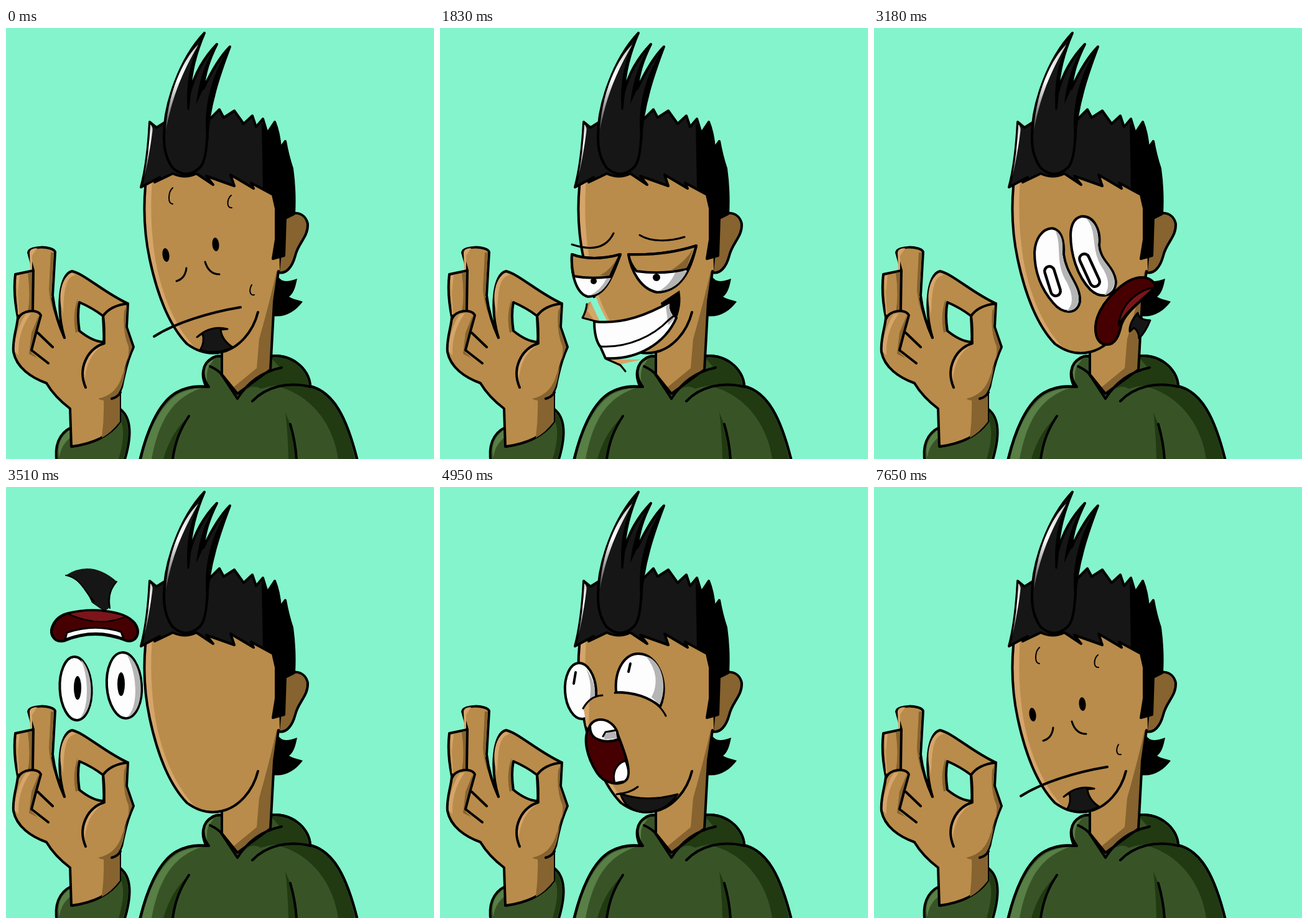
An HTML page for the animation above (8100 ms loop, 688x693 px).

```html
<!DOCTYPE html>
<html lang="en">
<head>
<meta charset="utf-8">
<title>Face shuffle</title>
<style>
  html, body { margin: 0; width: 100%; height: 100%; overflow: hidden; background: #84f4cc; }
  svg { display: block; width: 100%; height: 100%; }
  path, ellipse { stroke: #000; stroke-width: 4; stroke-linejoin: round; stroke-linecap: round; fill: none; }
  .flat { stroke: none; }
  .skin { fill: #b98c4b; }
  .light { fill: #d5a56a; stroke: none; }
  .shade { fill: #86632f; stroke: none; }
  .hair { fill: #161616; }
  .dark { fill: #000; stroke: none; }
  .cloth { fill: #385427; }
  .cloth-dark { fill: #213a12; stroke: none; }
  .cloth-light { fill: #587f45; stroke: none; }
  .white { fill: #fdfdfd; }
  .grey { fill: #b5b5b5; stroke: none; }
  .gloss { fill: url(#gloss); stroke: none; }
  .mouth { fill: #460002; }
  .tongue { fill: #7b1519; }
  .bg { fill: #84f4cc; }
  .thin { stroke-width: 2; }
  .fine { stroke-width: 3; }
  .ring { stroke-width: 20; }
  .ring-core { stroke: #fdfdfd; stroke-width: 11; }

  /* Each face: 420 ms in, 930 ms hold, 420 ms out, then waits off stage. */
  .face { animation: 8100ms infinite both; animation-delay: calc(480ms + 1350ms * var(--slot) - 8100ms); }
  .top-right { animation-name: topRight; }
  .left-down { animation-name: leftDown; }
  @keyframes topRight {
    0% { transform: translate(0, -720px); animation-timing-function: steps(14, jump-both); }
    5.185185%, 16.666667% { transform: none; animation-timing-function: steps(14, jump-both); }
    21.851852%, 100% { transform: translate(810px, 0); }
  }
  @keyframes leftDown {
    0% { transform: translate(-810px, 0); animation-timing-function: steps(14, jump-both); }
    5.185185%, 16.666667% { transform: none; animation-timing-function: steps(14, jump-both); }
    21.851852%, 100% { transform: translate(0, 720px); }
  }
  .nudge { animation: nudge 8100ms step-end infinite; }
  @keyframes nudge { 0% { transform: none; } 50%, 100% { transform: translate(-2px, 1px); } }
  .gap { stroke: #84f4cc; stroke-width: 6; stroke-linecap: butt; animation: gap 8100ms step-end infinite; }
  @keyframes gap { 0% { opacity: 0; } 11.111111% { opacity: 1; } 24% { opacity: 0; } }
</style>
</head>
<body>
<svg viewBox="0 0 688 693" preserveAspectRatio="none">
  <defs>
    <linearGradient id="gloss" x1="0" y1="0" x2="0" y2="1">
      <stop offset="0" stop-color="#ccc"/><stop offset=".4" stop-color="#fff"/><stop offset="1" stop-color="#444"/>
    </linearGradient>
  </defs>
  <rect width="688" height="693" fill="#84f4cc"/>

  <g id="tail-and-ear">
    <path class="dark" d="M434 394C442 410 450 409 468 403C465 418 462 427 455 432C463 437 470 437 477 440C464 457 448 466 428 463Z"/>
    <path class="shade" style="stroke:#000" d="M446 307C458 292 481 295 485 315C486 336 470 345 465 366C460 385 450 396 438 393Z"/>
  </g>

  <g id="hoodie">
    <path class="cloth" d="M214 700C225 652 244 603 274 586C290 577 306 575 322 577C313 560 315 540 331 531Q338 526 349 528L372 560L424 528C455 522 488 546 489 576C526 585 548 625 566 700Z"/>
    <path class="cloth-light" d="M219 693C229 646 250 604 278 588Q294 580 314 579C270 594 246 628 234 693Z"/>
    <path class="cloth-light" d="M321 572C314 555 319 538 334 533L325 546Q321 558 324 574Z"/>
    <path class="cloth-dark" d="M426 530C454 525 485 548 486 575Q440 570 410 580Q395 572 384 584Q405 553 441 547Z"/>
    <path class="cloth-dark" d="M436 576Q462 571 488 578C524 588 546 627 561 693H534C526 636 490 590 436 576Z"/>
    <path class="cloth-dark" d="M294 624Q265 650 253 693H268Q274 650 294 624ZM449 618Q453 650 454 693H467Q465 660 457 637Z"/>
    <path d="M214 700C225 652 244 603 274 586C290 577 306 575 326 577C313 560 315 540 331 531Q338 526 349 528M424 528C455 522 488 546 489 576C526 585 548 625 566 700M294 624C280 645 272 665 268 693M457 637Q465 664 467 693M396 600C418 577 452 568 490 577"/>
  </g>

  <g id="head">
    <path class="skin flat" d="M228 220C220 290 222 330 231 372C243 428 262 478 291 508Q318 528 347 521V558L372 588L424 551L426 520L431 440L440 390L436 220Z"/>
    <path class="light" d="M226 245C221 290 223 330 232 372C244 428 263 478 291 508L309 519C274 486 250 430 240 372Q230 310 235 245Z"/>
    <path class="shade" d="M438 391L431 440L425 551L372 588L364 579L403 547L407 500Q424 440 435 391Z"/>
    <path d="M225 245C220 290 222 330 231 372C243 428 262 478 291 508Q318 528 347 521C374 515 397 489 405 457M347 521V558M438 391L431 440L425 550"/>
    <path d="M328 544Q343 551 347 558L372 596C387 572 410 553 443 546M347 557L372 588L424 550"/>
    <path class="gap" d="M248 434Q256 455 266 472"/>
  </g>

  <g id="hair">
    <path class="hair" d="M217 256Q228 215 231 151L242 160L258 150L326 148L343 131L350 144L367 133L382 154L396 141L402 159L413 146L420 169L432 151Q439 168 441 193L449 182Q453 205 460 226Q465 262 463 299L449 306L447 366L429 371L434 340V290L429 268L394 249L398 258L361 236L367 254L322 238L333 252L306 234Q288 243 268 234L239 248L247 240Z"/>
    <path class="dark" d="M411 152L420 169L432 151L441 193L449 182Q465 240 463 299L449 306L447 366L429 371L434 340V290L429 268L413 259Z"/>
    <path class="gloss" d="M232 155Q237 159 235 169Q228 220 222 239Q230 200 232 155Z"/>
    <path class="hair" d="M254 178C253 122 281 48 319 8C303 45 297 75 296 102C303 75 318 48 339 26C326 52 320 72 317 98C330 70 344 46 360 30C344 72 325 126 323 181Q321 214 312 224Q290 245 268 225Q254 206 254 178Z"/>
    <path class="dark" d="M319 8C303 45 297 75 296 102L292 132C288 85 298 45 319 8ZM339 26C326 52 320 72 317 98L306 122C310 85 320 55 339 26ZM360 30C344 72 325 126 323 181C315 125 333 70 360 30Z"/>
    <path class="gloss" d="M257 164C259 112 282 52 309 27C287 66 269 102 257 164Z"/>
    <path class="fine" d="M293 130L296 102M324 147V180"/>
  </g>

  <g id="hand">
    <path class="cloth" d="M105 642C85 652 77 672 82 700H189C201 663 204 629 184 613L182 632C163 661 133 669 106 673Z"/>
    <path class="cloth-light" d="M103 646C86 658 82 674 86 691Q87 672 104 658Z"/>
    <path class="cloth-dark" d="M184 616C201 632 198 666 188 693H181Q194 650 184 630Z"/>
    <path class="skin" d="M105 673L103 612Q78 593 65 571C40 562 17 546 12 521C10 500 18 482 19 465C13 436 13 412 15 396L44 390L36 361C37 350 75 350 79 360L75 430Q79 464 94 498C80 452 86 395 106 391C126 395 158 426 196 443L194 481L205 513C193 539 192 552 188 568Q187 577 183 585V633C166 658 134 669 105 673Z"/>
    <path class="light" d="M38 362Q38 354 50 354L42 366V388H39ZM17 399L22 397L19 425L21 459L19 461ZM14 520C13 500 22 474 32 460L40 459C26 478 19 500 20 526ZM88 445C84 410 100 393 107 394L112 397C96 400 93 420 92 460ZM126 570C119 535 137 512 158 509C135 523 129 543 126 570Z"/>
    <path class="shade" d="M72 361H77L73 430L88 479Q72 456 69 420ZM42 393V454L35 457Q40 430 35 394ZM53 461L48 492L41 522L51 531L37 524L41 490ZM118 487L112 490Q106 462 115 436ZM194 447L192 480L203 513C188 550 193 569 180 588Q160 604 148 596Q178 590 187 558Q199 534 197 512Q187 490 190 455ZM183 588V633Q169 651 154 659Q158 628 157 598Z"/>
    <path class="bg" d="M118 441Q139 450 156 463Q159 485 157 505Q139 504 118 487Q114 462 118 441Z"/>
    <path d="M44 390L43 453M19 468C25 453 51 451 56 462L48 491L41 518L68 539M51 490L75 513M75 435Q80 468 94 498M196 443Q168 446 156 463L158 507C130 516 115 548 128 578M184 586Q179 594 170 596"/>
  </g>

  <g class="face top-right" style="--slot: 5"><g class="nudge">
    <path class="thin" d="M268 257C261 263 259 282 268 283M362 269C355 275 354 290 363 289M395 413C390 421 392 431 399 429"/>
    <ellipse class="dark" cx="257" cy="365" rx="5.500" ry="11" transform="rotate(-8 257 365)"/>
    <ellipse class="dark" cx="337" cy="348" rx="5.500" ry="11" transform="rotate(-5 337 348)"/>
    <path class="fine" d="M290 386Q288 403 274 407M320 376Q326 396 343 396"/>
    <path d="M238 496C274 473 329 457 377 449"/>
    <path class="hair fine" d="M307 497Q329 477 356 484L345 485Q347 502 364 513Q340 526 312 518Q320 505 316 491Z"/>
  </g></g>

  <g class="face left-down" style="--slot: 0"><g transform="translate(0 -48)">
    <path class="skin flat" d="M236 443Q235 455 229 466L256 472L242 440Z"/>
    <path class="light" d="M242 440L256 470L247 469L237 455ZM270 533H325L289 541L300 552Z"/>
    <path class="fine" d="M236 444Q235 455 229 466L252 472M267 532L290 542L298 552"/>
    <path class="fine" d="M212 348C242 358 267 355 279 330M321 333C340 345 370 343 393 336"/>
    <path class="white" d="M212 364Q245 376 290 364C277 400 266 431 238 432C220 428 210 398 212 364Z"/>
    <path class="grey" d="M268 402H275Q261 429 241 430Q259 421 268 402Z"/>
    <path class="skin" d="M212 364Q245 376 290 364L273 400Q243 404 215 399Q211 383 212 364Z"/>
    <path class="shade" d="M286 367L272 398H257Q276 388 286 367Z"/>
    <path class="white" d="M303 364Q363 366 412 350C403 390 387 424 349 425C323 420 307 391 303 364Z"/>
    <path class="grey" d="M379 391H397Q382 421 352 423Q371 412 379 391Z"/>
    <path class="skin" d="M303 364Q363 366 412 350Q407 369 398 387Q360 397 316 391Q305 379 303 364Z"/>
    <path class="shade" d="M407 355L396 386L371 390Q395 375 407 355Z"/>
    <ellipse class="dark" cx="247" cy="407" rx="5" ry="5"/><ellipse class="dark" cx="348" cy="401" rx="6" ry="6"/>
    <path class="dark" d="M355 442L385 422Q390 447 378 472L364 484Z"/>
    <path class="white" d="M248 472C295 477 335 460 371 440Q368 454 380 466C362 507 318 534 266 531L258 513Q248 500 248 472Z"/>
    <path class="grey" d="M369 443Q367 456 377 467L367 478L363 448Z"/>
    <path class="fine" d="M257 512C303 515 344 494 367 470L378 461"/>
  </g></g>

  <g class="face top-right" style="--slot: 1"><g transform="translate(-54 0)">
    <path class="white" d="M286 322C302 324 306 344 305 364C309 397 333 414 331 440C326 463 302 459 288 442C270 421 258 394 258 361C259 339 270 323 286 322Z"/>
    <path class="grey" d="M291 325C306 334 303 352 303 365C308 398 331 414 329 439Q325 455 310 455C323 443 318 425 310 409C290 377 303 350 291 325Z"/>
    <path class="white" d="M333 303C354 301 365 326 362 349C364 376 386 382 389 408C388 431 366 437 348 421C326 398 316 363 316 332Q317 307 333 303Z"/>
    <path class="grey" d="M341 306C359 312 362 335 360 349C362 376 384 382 387 407Q384 427 370 430C380 418 377 402 368 387C347 357 360 326 341 306Z"/>
    <path class="ring" d="M282 391L292 423M338 371L355 408"/>
    <path class="ring-core" d="M282 391L292 423M338 371L355 408"/>
    <path class="hair fine" d="M411 488Q410 474 424 458Q426 470 444 470Q436 490 426 499Q426 488 418 482Z"/>
    <path class="mouth" d="M430 401C444 401 454 410 451 418C435 435 409 452 398 475C394 495 388 510 373 509C357 508 352 486 359 465C368 439 403 401 430 401Z"/>
    <path class="tongue fine" d="M450 418C431 418 397 440 393 478C406 453 434 435 450 418Z"/>
  </g></g>

  <g class="face left-down" style="--slot: 2"><g transform="translate(0 -48)">
    <path class="hair flat" d="M258 190Q299 164 340 200Q326 217 330 241L320 248L300 234Q283 196 258 190Z"/>
    <path class="thin" d="M258 190C283 194 288 217 304 232M340 200Q323 220 329 243"/>
    <path class="mouth" d="M262 251C295 243 351 244 369 267C380 283 371 299 355 295Q304 275 257 295C239 300 230 284 238 269Q245 255 262 251Z"/>
    <path class="tongue thin" d="M262 252Q306 240 355 256Q312 275 262 252Z"/>
    <path class="white fine" d="M257 293L260 282Q305 267 347 281L351 292Q306 274 257 293Z"/>
    <ellipse class="white" cx="274" cy="372" rx="25.500" ry="51" transform="rotate(-3 274 372)"/>
    <path class="grey" d="M282 325C304 345 305 408 281 420C297 401 294 349 282 325Z"/>
    <ellipse class="white" cx="352" cy="367" rx="28" ry="53" transform="rotate(-4 352 367)"/>
    <path class="grey" d="M356 317C385 333 387 410 358 417C377 397 371 344 356 317Z"/>
    <ellipse class="dark" cx="277" cy="371" rx="6" ry="19"/><ellipse class="dark" cx="347" cy="365" rx="6" ry="19"/>
  </g></g>

  <g class="face top-right" style="--slot: 3">
    <ellipse class="white" cx="226" cy="328" rx="25" ry="45" transform="rotate(-4 226 328)"/>
    <path class="grey" d="M235 292Q251 316 249 335L240 343Q246 320 235 292Z"/>
    <path class="skin flat" d="M230 355Q247 331 285 334L355 354L343 378L240 390Z"/>
    <path class="light" d="M231 355L240 346L239 383L235 385Z"/>
    <path class="white" d="M283 330C280 292 298 268 319 268C350 268 370 315 354 353Q326 330 283 330Z"/>
    <path class="grey" d="M331 272C359 280 366 324 353 350L340 338Q357 305 331 272Z"/>
    <path d="M218 298L215 316M306 284L303 297"/>
    <path class="fine" d="M230 356Q241 336 261 335M281 331C318 329 350 342 363 368"/>
    <path class="mouth" d="M240 386C248 368 273 371 284 393C291 413 309 452 301 469C291 483 263 477 252 459C236 434 229 404 240 386Z"/>
    <path class="white" d="M241 384C249 368 276 371 285 394L286 406Q267 413 250 404Q241 399 241 384Z"/>
    <path class="grey" d="M281 392L285 404L265 406Q259 396 281 392Z"/>
    <path class="white fine" d="M298 440Q308 464 297 473L281 476C276 460 283 445 298 440Z"/>
    <path class="fine" d="M283 391L266 394L262 401"/>
    <path class="hair fine" d="M290 493Q330 508 382 494Q361 524 326 523Q298 519 290 493Z"/>
    <path class="fine" d="M284 494Q306 492 318 482"/>
  </g>

  <g class="face left-down" style="--slot: 4">
    <path class="fine" d="M411 374L420 392"/>
    <ellipse class="white" cx="419" cy="360" rx="30" ry="13.500" transform="rotate(-3 419 360)"/>
    <path class="white" d="M323 379C322 360 359 352 386 354C402 357 400 372 386 378C367 386 327 393 323 379Z"/>
    <path class="grey" d="M386 356Q401 362 392 373Q383 377 377 378Q391 367 386 356Z"/>
    <ellipse class="dark" cx="387" cy="366" rx="3.500" ry="4"/><ellipse class="dark" cx="438" cy="357" rx="4" ry="4.500"/>
    <path class="mouth" style="fill:#650004" d="M422 393C397 390 340 394 322 416C311 430 312 443 324 446C361 450 407 423 422 393Z"/>
    <path class="grey" d="M318 422C326 405 354 399 383 398L382 409L344 422ZM318 437L340 431L341 421L359 417L376 425Q347 447 324 444Z"/>
    <path class="thin" d="M317 424L344 421L382 409L384 398M317 437L340 431L341 420M341 431L359 426L376 431"/>
    <path class="hair fine" d="M361 465Q380 461 395 442L389 452Q389 468 397 473Q376 511 342 521Q366 502 370 463Z"/>
  </g>
</svg>
</body>
</html>
```
